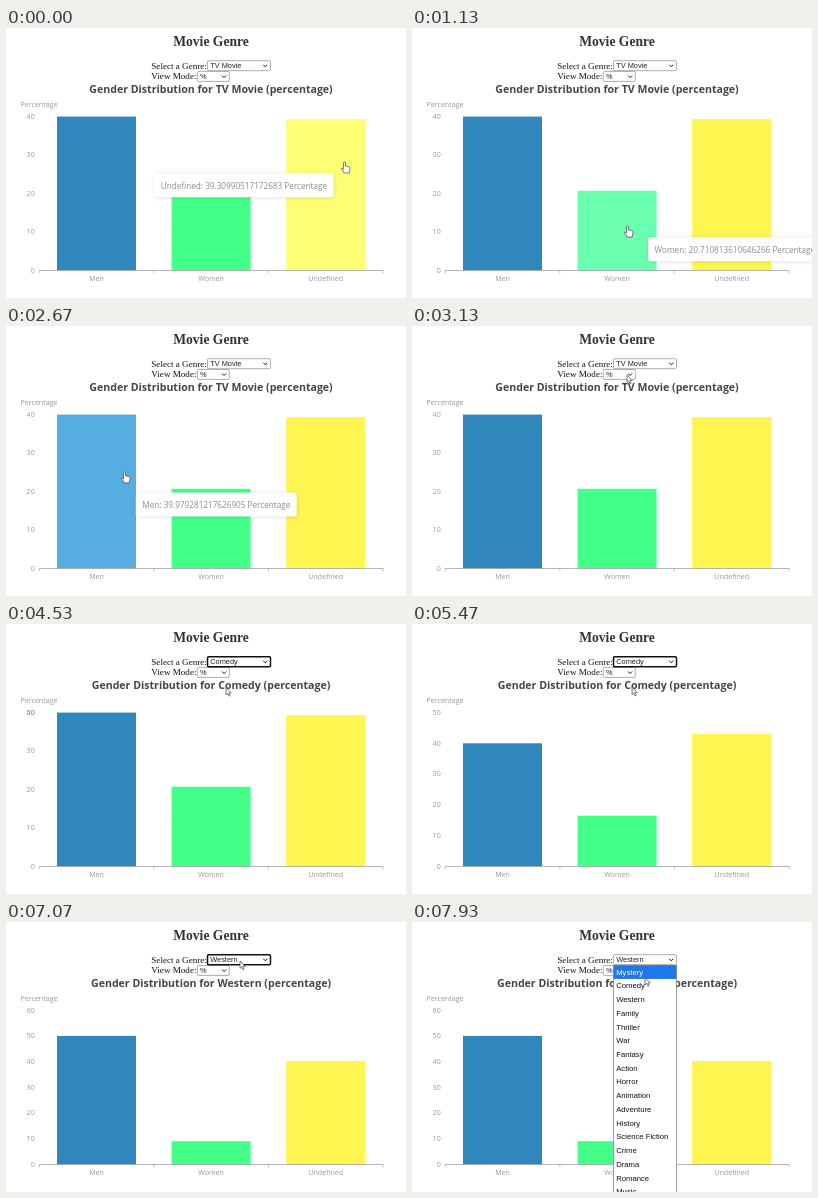
An HTML page with a canvas for the animation above (8 s loop, 400x270 px).

```html
<!DOCTYPE html>
<html lang="en">
<head>
<meta charset="utf-8">
<title>Movie Genre</title>
<style>
  html, body { margin: 0; width: 100%; height: 100%; overflow: hidden; background: #fff; }
  canvas { display: block; width: 400px; height: 270px; }
</style>
</head>
<body>
<canvas id="stage"></canvas>
<script>
const W = 400, H = 270, LOOP = 8000;
const canvas = document.getElementById('stage');
const ctx = canvas.getContext('2d');
const ratio = window.devicePixelRatio || 1;
canvas.width = W * ratio;
canvas.height = H * ratio;

const SANS = '"Open Sans", "Noto Sans", sans-serif';
const SERIF = '"Liberation Serif", "Times New Roman", serif';
const ARIAL = '"Liberation Sans", Arial, sans-serif';

const LEFT = 33.2, BASE = 242.5, PLOT = 154, BAND = 114.6, BAR_W = 79;
const ROW = 13.72, LIST_TOP = 43.2;
const SPEED = 0.297; // cursor, px per ms
const LAG = 200;     // hover and tooltip transitions, ms

const BARS = [
  { name: 'Men', color: [48, 135, 187], value: '39.979281217626905' },
  { name: 'Women', color: [68, 255, 136], value: '20.710813610646266' },
  { name: 'Undefined', color: [255, 245, 80], value: '39.30990517172683' }
];
const GENRES = ['Mystery', 'Comedy', 'Western', 'Family', 'Thriller', 'War', 'Fantasy',
  'Action', 'Horror', 'Animation', 'Adventure', 'History', 'Science Fiction', 'Crime',
  'Drama', 'Romance', 'Music', 'Documentary', 'TV Movie'];

// Each chart lasts from its pick until the list, opened at `opens`, yields the next.
const CHARTS = [
  { picked: 0, opens: 3530, genre: 'TV Movie', max: 40, values: [39.98, 20.71, 39.31] },
  { picked: 4510, opens: 5740, genre: 'Comedy', max: 50, values: [40, 16.5, 43.1] },
  { picked: 6600, opens: 7600, genre: 'Western', max: 60, values: [50.1, 9.1, 40.3] }
];

// Where the cursor heads, and when it sets off
const STOPS = [
  { at: 0, x: 338.5, y: 134 },
  { at: 470, x: 215.5, y: 198 },
  { at: 1600, x: 107.5, y: 157 },
  { at: 2618, x: 226, y: 38 },
  { at: 3900, x: 220, y: 63.5 },
  { at: 5470, x: 228, y: 38 },
  { at: 5850, x: 222, y: 54 },
  { at: 6180, x: 220.5, y: 80 },
  { at: 6900, x: 234, y: 39 },
  { at: 7870, x: 233, y: 55.5 }
];

const mix = (a, b, k) => a + (b - a) * k;
const clamp = k => Math.min(1, Math.max(0, k));
const inOut = k => k < 0.5 ? 4 * k ** 3 : 1 - (2 - 2 * k) ** 3 / 2;
const mean = list => list.reduce((a, b) => a + b, 0) / list.length;
const barX = i => LEFT + BAND * i + (BAND - BAR_W) / 2;

function cursorAt(t) {
  const i = Math.max(0, STOPS.findLastIndex(s => s.at <= t));
  const to = STOPS[i], from = STOPS[Math.max(0, i - 1)];
  const time = Math.hypot(to.x - from.x, to.y - from.y) / SPEED || 1;
  const k = clamp((t - to.at) / time);
  return { x: mix(from.x, to.x, k), y: mix(from.y, to.y, k) };
}

function chartAt(t) {
  const i = Math.max(0, CHARTS.findLastIndex(c => c.picked <= t));
  const now = CHARTS[i], old = CHARTS[Math.max(0, i - 1)];
  const k = inOut(clamp((t - now.picked) / 500));
  return {
    ...now,
    open: t >= now.opens,
    focused: i > 0 && t < now.opens,
    heights: now.values.map((v, j) => PLOT * mix(old.values[j] / old.max, v / now.max, k)),
    tickY: v => BASE - PLOT * v / (v > old.max ? now.max : 1 / mix(1 / old.max, 1 / now.max, k))
  };
}

function barUnder({ x, y }, heights) {
  return BARS.findIndex((b, i) =>
    x > barX(i) && x < barX(i) + BAR_W && y < BASE && y > BASE - heights[i]);
}

// Recent pointer history, which smooths the hover effects
function recentHover(t, heights) {
  return Array.from({ length: 20 }, (_, i) => {
    const p = cursorAt(t - i * LAG / 20);
    return { ...p, bar: barUnder(p, heights) };
  });
}

function text(str, x, y, font, color, align = 'left') {
  ctx.font = font;
  ctx.fillStyle = color;
  ctx.textAlign = align;
  ctx.fillText(str, x, y);
}

function line(points, color, width) {
  ctx.beginPath();
  points.forEach(p => ctx.lineTo(...p));
  ctx.strokeStyle = color;
  ctx.lineWidth = width;
  ctx.stroke();
}

function drawChart(chart, hover) {
  text(`Gender Distribution for ${chart.genre} (percentage)`, 205, 64.6,
    `700 10.6px ${SANS}`, '#464646', 'center');
  const font = `7.1px ${SANS}`, gray = '#999';
  text('Percentage', 14.5, 78.5, font, gray);
  for (let v = 0; v <= chart.max; v += 10) {
    text(v, 28.7, chart.tickY(v) + 2.2, font, gray, 'right');
  }
  BARS.forEach((bar, i) => {
    const glow = mean(hover.map(p => p.bar === i ? 1 : 0));
    const rgb = bar.color.map(c => Math.min(255, Math.round(c + 38 * glow)));
    ctx.fillStyle = `rgb(${rgb})`;
    ctx.fillRect(barX(i), BASE - chart.heights[i], BAR_W, chart.heights[i]);
    text(bar.name, LEFT + BAND * (i + 0.5), 253, font, gray, 'center');
  });
  line([[LEFT, BASE], [LEFT + BAND * 3, BASE]], '#a4a4a4', 0.8);
  for (let i = 0; i <= 3; i++) {
    const x = LEFT + BAND * i;
    line([[x, BASE], [x, BASE + 2.8]], '#a4a4a4', 0.7);
  }
}

function drawSelect(x, y, w, label, focused) {
  ctx.beginPath();
  ctx.roundRect(x, y, w, 10, 1.2);
  ctx.fillStyle = '#fff';
  ctx.fill();
  ctx.strokeStyle = focused ? '#111' : '#8c8c8c';
  ctx.lineWidth = focused ? 1.5 : 0.7;
  ctx.stroke();
  text(label, x + 2.7, y + 7.6, `7.4px ${ARIAL}`, '#222');
  const cx = x + w - 5.2, cy = y + 4.1;
  line([[cx - 2, cy], [cx, cy + 2], [cx + 2, cy]], '#111', 1);
}

function drawHeader(chart) {
  text('Movie Genre', 205, 17.8, `700 13.6px ${SERIF}`, '#333', 'center');
  text('Select a Genre:', 145.3, 40.8, `9.1px ${SERIF}`, '#111');
  text('View Mode:', 145.3, 51.4, `9.1px ${SERIF}`, '#111');
  drawSelect(191.3, 43.4, 32, '%', false);
  drawSelect(201.5, 32.7, 63, chart.genre, chart.focused);
}

function drawTip(hover) {
  const hits = hover.filter(p => p.bar >= 0);
  if (!hits.length) return;
  const { name, value } = BARS[hits[0].bar];
  const label = `${name}: ${value} Percentage`;
  const font = `8.2px ${SANS}`;
  ctx.save();
  ctx.font = font;
  const w = ctx.measureText(label).width + 13;
  // Sits right of the pointer, or left of it near the edge
  const x = mean(hits.map(p => p.x > W * 0.6 ? p.x - 11 - w : p.x + 20.5));
  const y = mean(hits.map(p => p.y)) + 11.2;
  ctx.globalAlpha = clamp(2 * hits.length / hover.length);
  ctx.shadowColor = 'rgba(0,0,0,0.14)';
  ctx.shadowBlur = 4 * ratio;
  ctx.shadowOffsetX = ctx.shadowOffsetY = 0.6 * ratio;
  ctx.fillStyle = '#fff';
  ctx.beginPath();
  ctx.roundRect(x, y, w, 24, 2.2);
  ctx.fill();
  ctx.shadowColor = 'transparent';
  text(label, x + 6.6, y + 15.4, font, '#8c8c8c');
  ctx.restore();
}

function drawList(genre, { x, y }) {
  const inside = x > 201 && x < 265 && y > LIST_TOP;
  const active = inside ? Math.floor((y - LIST_TOP) / ROW) : GENRES.indexOf(genre);
  ctx.fillStyle = '#fff';
  ctx.fillRect(201.4, LIST_TOP, 63.2, H);
  GENRES.forEach((name, i) => {
    const top = LIST_TOP + i * ROW;
    if (i === active) {
      ctx.fillStyle = '#2077ea';
      ctx.fillRect(201.5, top, 63, ROW);
    }
    text(name, 204.2, top + 9.5, `7.7px ${ARIAL}`, i === active ? '#fff' : '#111');
  });
  ctx.strokeStyle = '#777';
  ctx.lineWidth = 0.7;
  ctx.strokeRect(201.4, LIST_TOP, 63.2, H);
}

const arrow = new Path2D('M0 0V7.4L1.7 5.9L2.9 8.6L4.1 8.1L2.9 5.4H5.2Z');
const hand = new Path2D('M-1 1Q-1 0 0 0T1 1V4L4 4.6Q5.6 5 5.5 6.5L4.8 9.5V11H-.7V10L-3 7.2Q-3.3 6 -2.2 6.2L-1 7.2Z');

function drawCursor({ x, y }, shape) {
  ctx.save();
  ctx.translate(x, y);
  ctx.fillStyle = '#fff';
  ctx.fill(shape);
  ctx.strokeStyle = '#444';
  ctx.lineWidth = 0.7;
  ctx.lineJoin = 'round';
  ctx.stroke(shape);
  ctx.restore();
}

function draw(t) {
  const chart = chartAt(t);
  const cursor = cursorAt(t);
  const hover = recentHover(t, chart.heights);
  ctx.setTransform(ratio, 0, 0, ratio, 0, 0);
  ctx.fillStyle = '#fff';
  ctx.fillRect(0, 0, W, H);
  drawChart(chart, hover);
  drawHeader(chart);
  drawTip(hover);
  if (chart.open) drawList(chart.genre, cursor);
  drawCursor(cursor, hover[0].bar >= 0 ? hand : arrow);
}

const start = performance.now();
function loop() {
  draw((performance.now() - start) % LOOP);
  requestAnimationFrame(loop);
}
loop();
</script>
</body>
</html>
```
